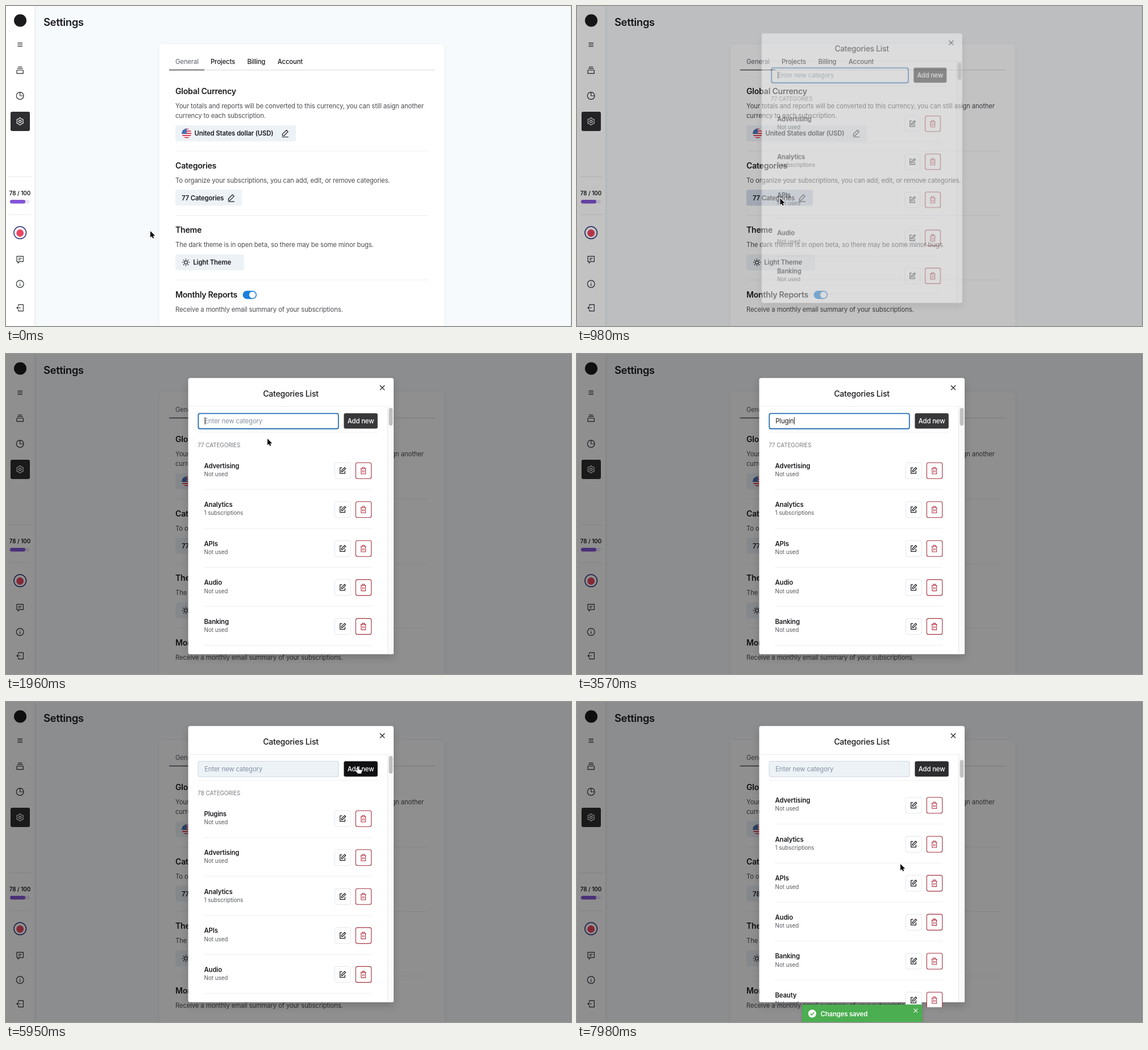
Write an HTML page with a canvas that moves like this. It is 994 by 563 pixels and loops after 8000 ms.

```html
<!DOCTYPE html>
<html lang="en">
<head>
<meta charset="utf-8">
<title>Settings</title>
<style>
html, body { margin: 0; width: 100%; height: 100%; overflow: hidden; background: #f7fafc; }
canvas { display: block; width: 994px; height: 563px; }
</style>
</head>
<body>
<canvas id="stage"></canvas>
<script>
const W = 994, H = 563, LOOP = 8000, STEP = 70;
const dpr = window.devicePixelRatio || 1;
const INK = '#1a1b1e', GRAY = '#4b4d51';

function setup(canvas) {
  canvas.width = W * dpr;
  canvas.height = H * dpr;
  const g = canvas.getContext('2d');
  g.scale(dpr, dpr);
  return g;
}
const main = setup(document.getElementById('stage'));
const layer = setup(document.createElement('canvas'));
let c = main;

const clamp = x => Math.max(0, Math.min(1, x));
const smooth = x => { x = clamp(x); return x * x * (3 - 2 * x); };

// font size: letter spacing in em
const TRACK = { 9.9: -.006, 11.3: -.011, 14.1: -.017, 18.4: -.019 };

function text(s, x, y, size, weight = 400, color = INK, align = 'left') {
  c.font = `${weight} ${size}px Inter, sans-serif`;
  c.letterSpacing = size * TRACK[size] + 'px';
  c.textAlign = align;
  c.fillStyle = color;
  c.fillText(s, x, y);
  return c.measureText(s).width;
}

function box(x, y, w, h, r, fill, stroke, lw = 1) {
  c.beginPath();
  c.roundRect(x, y, w, h, r);
  if (fill) { c.fillStyle = fill; c.fill(); }
  if (stroke) { c.strokeStyle = stroke; c.lineWidth = lw; c.stroke(); }
}

function shadowBox(x, y, w, h, r, fill, blur, dy, alpha) {
  c.save();
  c.shadowColor = `rgba(0,0,0,${alpha})`;
  c.shadowBlur = blur * dpr;
  c.shadowOffsetY = dy * dpr;
  box(x, y, w, h, r, fill);
  c.restore();
}

function disc(x, y, r, fill, stroke, lw = 1) {
  c.beginPath();
  c.arc(x, y, r, 0, 7);
  if (fill) { c.fillStyle = fill; c.fill(); }
  if (stroke) { c.strokeStyle = stroke; c.lineWidth = lw; c.stroke(); }
}

function rule(x1, x2, y, color, lw = 1) {
  c.fillStyle = color;
  c.fillRect(x1, y - lw / 2, x2 - x1, lw);
}

const ICONS = {
  menu: 'M6 8h12M6 12h12M6 16h12',
  stack: 'M7 4h10M5 8h14M4 12h16v8H4z',
  pie: 'M21 12a9 9 0 1 1-18 0a9 9 0 1 1 18 0M12 3v9h9',
  chat: 'M4 4h16v13h-9l-4 4v-4H4zM8 9h8M8 13h5',
  info: 'M21 12a9 9 0 1 1-18 0a9 9 0 1 1 18 0M12 11v6M12 7v1.5',
  exit: 'M8 8V4h12v16H8v-4M14 12H4M7 9l-3 3 3 3',
  pencil: 'M5 18v-4L15 4l4 4L9 18zM4 21.2h16',
  edit: 'M11 4H5v16h14v-7M9 15v-3l9-9 3 3-9 9z',
  trash: 'M4 6.5h16M6 6.5V21h12V6.5M9 6V3h6v3M10 11v6M14 11v6',
  search: 'M20 11a8.5 8.5 0 1 1-17 0a8.5 8.5 0 1 1 17 0M17.5 17.5l4 4',
  close: 'M6 6l12 12M18 6L6 18',
  tick: 'M7 12.5l3.5 3.5 6.5-7'
};
for (const k in ICONS) ICONS[k] = new Path2D(ICONS[k]);

function icon(name, x, y, color = '#2c2e31', scale = .707, lw = 1.7) {
  c.save();
  c.translate(x, y);
  c.scale(scale, scale);
  c.translate(-12, -12);
  c.strokeStyle = color;
  c.lineWidth = lw;
  c.lineJoin = 'round';
  c.stroke(ICONS[name]);
  c.restore();
}

function gear(x, y) {
  c.beginPath();
  for (let i = 0; i < 60; i++) {
    const a = i * Math.PI / 30, r = 5.6 + .65 * Math.cos(6 * a);
    c.lineTo(x + r * Math.sin(a), y + r * Math.cos(a));
  }
  c.closePath();
  c.strokeStyle = '#fff';
  c.lineWidth = 1.2;
  c.stroke();
  disc(x, y, 2.1, null, '#fff', 1.2);
}

function sun(x, y) {
  disc(x, y, 2.8, null, INK, 1.2);
  c.beginPath();
  for (let i = 0; i < 8; i++) {
    const a = i * Math.PI / 4, u = Math.cos(a), v = Math.sin(a);
    c.moveTo(x + 4.6 * u, y + 4.6 * v);
    c.lineTo(x + 6.4 * u, y + 6.4 * v);
  }
  c.lineWidth = 1.3;
  c.stroke();
}

function flag(x, y, r) {
  c.save();
  c.beginPath();
  c.arc(x, y, r, 0, 7);
  c.clip();
  const h = 2 * r / 9;
  for (let i = 0; i < 9; i++) {
    c.fillStyle = i % 2 ? '#fff' : '#d3273e';
    c.fillRect(x - r, y - r + i * h, 2 * r, h + .1);
  }
  c.fillStyle = '#2a5ca8';
  c.fillRect(x - r, y - r, r, r + .9);
  for (let i = 0; i < 9; i++)
    disc(x - 7 + (i % 3) * 2.6, y - 6.4 + (i / 3 | 0) * 2.6, .55, '#fff');
  c.restore();
}

function sidebar() {
  shadowBox(0, 0, 50, H, 0, '#fff', 5, 0, .12);
  disc(25, 25.5, 11, '#1b1b1d');
  icon('menu', 24.7, 68);
  icon('stack', 24.7, 113);
  icon('pie', 24.7, 158);
  box(8, 186, 34, 34, 3, '#2e2e30');
  gear(24.7, 203);
  rule(5, 45, 300.5, '#e6e8ea');
  text('78 / 100', 24.5, 332.5, 9.9, 600, INK, 'center');
  box(7, 341, 35, 6.5, 3.2, '#ebe6f8');
  box(7, 341, 27, 6.5, 3.2, '#8455d6');
  rule(5, 45, 367, '#e6e8ea');
  disc(24.7, 398.8, 10.8, '#fff', '#2b2f78', 1.5);
  disc(24.7, 399.5, 6.4, '#ec4560');
  icon('chat', 24.7, 446);
  icon('info', 24.7, 489);
  icon('exit', 24.7, 531);
}

function section(title, y, lines) {
  text(title, 298, y, 14.1, 600);
  lines.forEach((s, i) => text(s, 298, y + 25 + i * 17, 11.3, 400, GRAY));
}

function page(t) {
  c.fillStyle = '#f7fafc';
  c.fillRect(0, 0, W, H);
  sidebar();
  c.fillStyle = '#e6e9eb';
  c.fillRect(W - 1, 0, 1, H);
  text('Settings', 66, 34.5, 18.4, 600);

  shadowBox(270, 67, 501, 520, 5, '#fff', 6, 1, .06);
  const tabs = [['General', 298], ['Projects', 360], ['Billing', 424.5], ['Account', 477.7]];
  tabs.forEach(([s, x], i) => text(s, x, 102.3, 11.3, i ? 500 : 400, i ? INK : '#5a5f68'));
  rule(287, 755, 112.6, '#dfe1e3', 1.4);
  rule(287, 349, 112.5, '#45484d', 1.4);

  section('Global Currency', 155, [
    'Your totals and reports will be converted to this currency, you can still asign another',
    'currency to each subscription.'
  ]);
  box(298, 210, 212, 28, 3, '#edf2f7');
  flag(317.8, 224, 8.6);
  text('United States dollar (USD)', 331.5, 228.2, 11.3, 600);
  icon('pencil', 491.3, 224, INK);

  section('Categories', 286, ['To organize your subscriptions, you can add, edit, or remove categories.']);
  box(298, 323.3, 117, 28, 3, t >= 840 && t < 1050 ? '#d3dcea' : '#edf2f7');
  text((t < 6090 ? 77 : 78) + ' Categories', 309, 342, 11.3, 600);
  icon('pencil', 396.3, 337.7, INK);

  section('Theme', 399.3, ['The dark theme is in open beta, so there may be some minor bugs.']);
  box(298, 437, 121, 28, 3, '#edf2f7');
  sun(316.5, 451.2);
  text('Light Theme', 329.3, 455.2, 11.3, 600);

  section('Monthly Reports', 513, ['Receive a monthly email summary of your subscriptions.']);
  box(416.5, 501, 24.5, 14.4, 7.2, '#1a80de');
  disc(433.6, 508.2, 5.8, '#fff');
  for (const y of [255, 368.5, 482]) rule(298, 744, y, '#ebeef1');
}

const NAMES = ['Advertising', 'Analytics', 'APIs', 'Audio', 'Banking', 'Beauty', 'Books'];
const TYPED = [2380, 2940, 3150, 3220, 3360, 3570, 4340];
const SAVED = 5600;

function rows(t) {
  const scroll = 90.6 * smooth((t - 6860) / 210) + 1.4 * clamp((t - 7210) / 140);
  const list = t < SAVED ? NAMES : ['Plugins', ...NAMES];
  c.save();
  c.beginPath();
  c.rect(321, scroll ? 148 : 139, 350, 389);
  c.clip();
  text((t < SAVED ? 77 : 78) + ' CATEGORIES', 337.3, 164 - scroll, 9.9, 400, '#76797e');
  list.forEach((name, i) => {
    const y = 205.2 + i * 68.55 - scroll;
    text(name, 348.5, y - 4.5, 11.3, 600);
    text(name === 'Analytics' ? '1 subscriptions' : 'Not used', 348.5, y + 9.7, 9.9, 400, '#55585d');
    box(578.5, y - 14, 27.6, 28, 3, '#fff', '#e2e6ec');
    icon('edit', 592, y, INK, .62, 2);
    box(615.3, y - 14, 27.4, 28, 3, '#fff', '#a3303d', 1.1);
    icon('trash', 628.7, y, '#b0313f', .64, 1.7);
    rule(348, 643, y + 33, '#ebeef1');
  });
  c.restore();
  c.fillStyle = '#fafafa';
  c.fillRect(671, 92, 11, 436);
  c.fillStyle = '#e8e8e8';
  c.fillRect(671, 92, 1, 436);
  box(673.6, 95 + scroll * 7 / 92, 6.8, 31, 3.4, '#c1c1c1');
}

function field(t, empty) {
  const focus = t < 5250;
  const w = empty ? 258 : 246.5;
  if (focus) box(338.3, 104.7, w, 26.8, 3, '#fff', '#246fb4', 1.8);
  else box(338, 104.3, w + .5, 27.3, 3, '#edf2f7', '#ccd5e0', 1);
  const past = TYPED.filter(k => k <= t);
  const value = t < SAVED ? 'Plugins'.slice(0, past.length) : '';
  let end = 0;
  if (value) end = text(value, 349.2, 122, 11.3);
  else if (!empty) text('Enter new category', 349.2, 122, 11.3, 400, '#8390a3');
  const since = t - (past.pop() || 840);
  if (focus && Math.floor(since / 560) % 2 === 0) {
    c.fillStyle = INK;
    c.fillRect(349.6 + end, 111, 1, 13);
  }
}

function modal(t, empty) {
  const h = empty ? 280 : 486;
  shadowBox(320.5, 42.2, 361.5, h, 3.5, '#fff', 14, 6, .18);
  text('Categories List', 501, 75, 14.1, 500, INK, 'center');
  icon('close', 662, 59.3, INK, .68, 1.8);
  rule(320.5, 682, 92.3, '#ebebeb');
  field(t, empty);
  const hover = t >= 4970 && t < 6160;
  const bx = empty ? 606 : 594.4;
  box(bx, 104.2, 59.4, 27, 3, hover ? '#101013' : t < 4970 ? '#38383a' : '#2d2d30');
  text('Add new', bx + 29.7, 122, 11.3, 500, '#fff', 'center');
  if (empty) {
    icon('search', 499, 198, '#777', 1.2, 1.5);
    text('Search for a service to add', 501, 258, 14.1, 600, '#555', 'center');
    text('Search by name or you can create a custom category', 501, 286, 11.3, 400, '#777', 'center');
  } else {
    rule(338, 654, 137.7, '#efefef');
    rows(t);
  }
}

function drawModal(t) {
  const p = smooth((t - 805) / 330);
  if (p <= 0) return;
  c.fillStyle = `rgba(0,0,0,${.44 * p})`;
  c.fillRect(0, 0, W, H);
  const empty = t < 980;
  c = layer;
  c.clearRect(0, 0, W, H);
  modal(t, empty);
  c = main;
  const s = .948 + .052 * p, cy = empty ? 182 : 285;
  c.save();
  c.globalAlpha = Math.pow(p, 1.4);
  c.translate(501.2, cy);
  c.scale(s, s);
  c.translate(-501.2, -cy);
  c.drawImage(layer.canvas, 0, 0, W, H);
  c.restore();
}

function toast(t) {
  const p = smooth((t - 6020) / 350);
  if (p <= 0) return;
  c.save();
  c.translate(0, 31 * (1 - p));
  shadowBox(396, 532.3, 211.5, 40, 3, '#4bae50', 5, 1, .2);
  disc(413.8, 548.3, 7, '#fff');
  icon('tick', 413.8, 548.2, '#4bae50', .62, 2.6);
  text('Changes saved', 428.6, 552.5, 11.3, 600, '#fff');
  icon('close', 595.8, 543, '#fff', .56, 2);
  c.restore();
}

// pointer path: time, x, y
const PATH = [
  [70, 254, 396], [420, 368, 336], [770, 368, 336], [910, 358, 336], [1050, 357, 341],
  [1540, 460, 149], [4340, 460, 139], [5040, 619, 114], [6090, 619, 114],
  [6650, 418, 246], [6790, 443, 251], [7420, 443, 251], [7980, 569, 285]
];
const ARROW = new Path2D('M0 0V11.2L2.6 8.9 4.3 12.8 6.2 12 4.5 8.2H8.2Z');
const HAND = new Path2D('M-1 0C0-1 1.2 0 1.2 1V4.5L6 5.8C7.2 6.2 7.2 7 7 8L6 12H0L-4 7.2C-4.2 6-3 5.5-2 6.4L-1 7.2Z');

function pointer(t) {
  if (t >= 2380 && t <= 4340) return;
  let x = PATH[0][1], y = PATH[0][2];
  for (let i = 1; i < PATH.length; i++) {
    const [t0, x0, y0] = PATH[i - 1], [t1, x1, y1] = PATH[i];
    if (t < t0) break;
    // rest at the end point until typing starts
    const k = t0 === 1540 && t < 2380 ? 0 : smooth((t - t0) / (t1 - t0));
    x = x0 + (x1 - x0) * k;
    y = y0 + (y1 - y0) * k;
  }
  const hand = t >= 4970 && t < 6160;
  c.save();
  c.translate(x, y);
  c.lineJoin = 'round';
  c.lineWidth = hand ? 1 : 1.6;
  c.strokeStyle = hand ? '#000' : '#fff';
  c.fillStyle = hand ? '#fff' : '#000';
  c.stroke(hand ? HAND : ARROW);
  c.fill(hand ? HAND : ARROW);
  c.restore();
}

const start = performance.now();
function frame() {
  const now = (performance.now() - start) % LOOP;
  const t = Math.floor(now / STEP) * STEP;
  page(t);
  drawModal(t);
  toast(t);
  pointer(t);
  requestAnimationFrame(frame);
}
frame();
</script>
</body>
</html>
```
